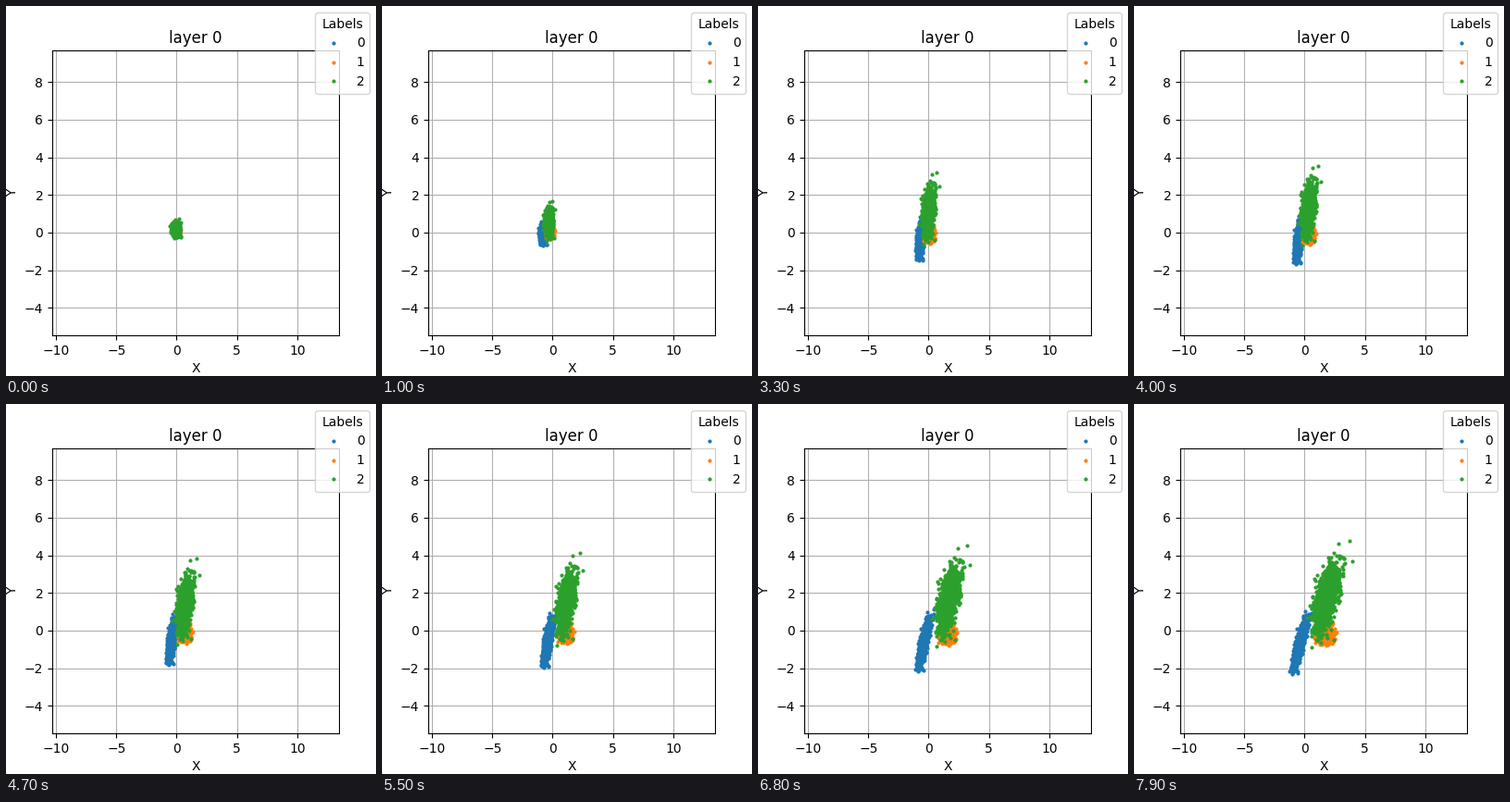
Write a matplotlib script that moves like this. It is 400 px wide and 400 px high and loops after 8 s.

```python
import numpy as np
import matplotlib.pyplot as plt
from matplotlib.animation import FuncAnimation

FRAMES, INTERVAL = 80, 100


def mix(ends, s):
    return ends[0] + (ends[1] - ends[0]) * s


class Cloud:
    """Point cloud that dips left, drifts right, stretches and leans."""

    def __init__(self, rng, count, tail, x, dip, drift, span, y, sx, sy, lean):
        # A sum of uniforms with unit variance; more terms give longer tails
        noise = rng.uniform(-1, 1, (tail, 2, count)).sum(axis=0)
        self.u, self.v = noise * np.sqrt(3 / tail)
        self.x, self.dip, self.drift, self.span = x, dip, drift, span
        self.y, self.sx, self.sy, self.lean = y, sx, sy, lean

    def at(self, t):
        pull = 1 - np.exp(-t / 0.07)
        grow = (1 - np.exp(-1.6 * t)) / (1 - np.exp(-1.6))
        fan = t ** 1.5
        ease = (1 - np.cos(np.pi * np.clip((t - 0.21) / self.span, 0, 1))) / 2
        cx = self.x - self.dip * pull + self.drift * ease
        x = cx + mix(self.sx, fan) * self.u + self.lean * fan * self.v
        y = mix(self.y, grow) + mix(self.sy, grow) * self.v
        return x, y


rng = np.random.default_rng(7)
clouds = [
    Cloud(rng, 550, 3, x=-0.05, dip=0.92, drift=0.54, span=0.42,
          y=(0.12, -0.72), sx=(0.14, 0.18), sy=(0.14, 0.69), lean=0.27),
    Cloud(rng, 550, 3, x=-0.05, dip=0.20, drift=1.96, span=0.79,
          y=(0.12, -0.14), sx=(0.13, 0.33), sy=(0.13, 0.26), lean=0),
    Cloud(rng, 1300, 12, x=-0.10, dip=0.30, drift=2.15, span=0.79,
          y=(0.17, 1.72), sx=(0.13, 0.40), sy=(0.16, 0.88), lean=0.32),
]

fig, ax = plt.subplots(figsize=(4, 4), dpi=100)
ax.set(xlim=(-10.315, 13.465), ylim=(-5.46, 9.68),
       xlabel="X", ylabel="Y", title="layer 0")
ax.grid(True)
dots = [ax.plot(*cloud.at(0), "o", ms=2, label=str(k))[0]
        for k, cloud in enumerate(clouds)]
fig.legend(title="Labels")


def update(frame):
    for dot, cloud in zip(dots, clouds):
        dot.set_data(*cloud.at(frame / (FRAMES - 1)))
    return dots


anim = FuncAnimation(fig, update, frames=FRAMES, interval=INTERVAL,
                     repeat=True, repeat_delay=0)
plt.show()
```
